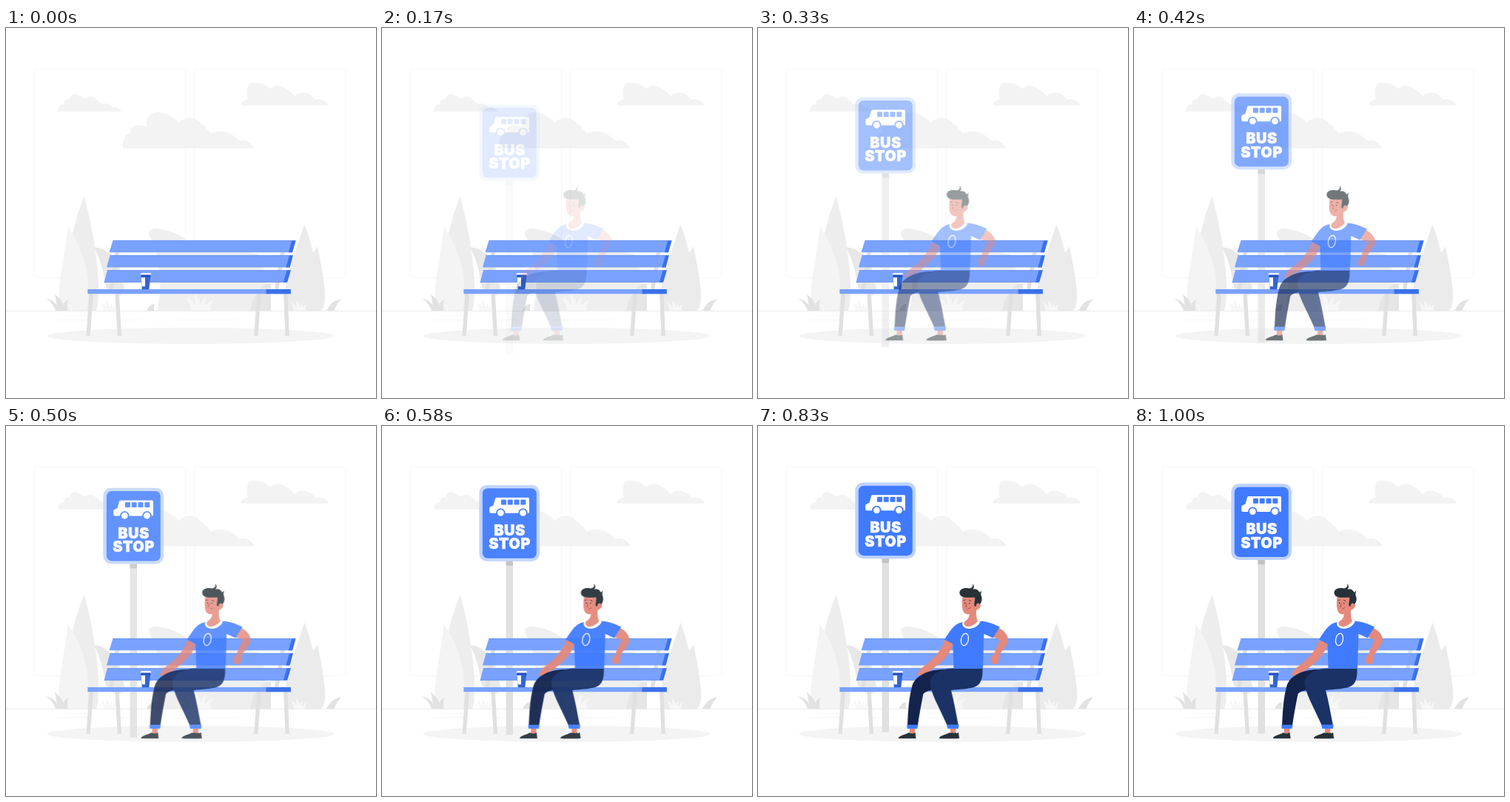
An HTML page for the animation above (1.04 s loop, 500 by 500 pixels).

```html
<!DOCTYPE html>
<html lang="en">
<head>
<meta charset="utf-8">
<title>Bus stop</title>
<style>
  html, body { margin: 0; width: 100%; height: 100%; overflow: hidden; background: #fff; }
  svg { display: block; width: 100vw; height: 100vh; }
  .slide {
    animation: slide 1s cubic-bezier(.36, -.01, .5, 1.38) var(--delay, 0s) both paused;
  }
  #sign { --from: 0px, 30px; }
  #man { --from: -30px, 0px; }
  @keyframes slide {
    from { opacity: 0; transform: translate(var(--from)); }
    to { opacity: 1; transform: translate(0px, 0px); }
  }
  text {
    font: 900 20px Inter, "Liberation Sans", sans-serif;
    fill: #fff; stroke: #fff; stroke-width: .5; letter-spacing: .4px; text-anchor: middle;
  }
</style>
</head>
<body>
<svg viewBox="0 0 500 500">
  <!-- windows and clouds -->
  <g fill="none" stroke="#f6f6f6">
    <rect x="38.5" y="55.5" width="204" height="282" rx="4"/>
    <rect x="254.5" y="55.5" width="204" height="282" rx="4"/>
  </g>
  <g fill="#f3f3f3">
    <path d="M70.5 112.7C70 106 74 103 79 103C78 97 82 95 86 97C86 89 94 88 98 91C102 92 104 95 107 95C112 91 118 92 121 96C125 98 127 102 130 102.5C136 101 141 103 144 107C149 106 154 109 156.5 112.7Z"/>
    <path d="M158.5 162.5C156 152 161 142 169 141C167 132 177 128 190 134C188 120 198 113 208 114C219 115 228 122 234 128C240 120 252 119 260 126C268 131 273 138 277 143C289 135 309 143 316 153C321 149 332 154 335 162.5Z"/>
    <path d="M317 104.7C319 99 323 97 327 96C324 84 326 74 335 73.5C343 73 351 77 357 82C366 74 380 80 390 92C399 83 412 88 418 97C425 94 433 98 436 104.7Z"/>
  </g>

  <!-- plants -->
  <path fill="#efefef" d="M193 279C193 271 201 269 211 272C224 275 241 281 246 290C262 300 330 300 345 308L358 382H205C213 340 206 300 193 279Z"/>
  <path fill="#e8e8e8" d="M118.500 296C133 296 149 310 155 328L160 352C160 366 145 364 135 350C132 330 127 310 118.500 296Z"/>
  <path fill="#e6e6e6" d="M330 382C332 364 345 345 358 345V382Z"/>
  <path fill="#ededed" d="M105.500 228C99 244 88 275 85 310C82 350 84 368 90 382H122C131 350 118 270 105.500 228Z"/>
  <path fill="#f4f4f4" d="M83.500 268C82 290 73 330 71 365Q71 377 75 382H108Q113 372 111 345C109 315 99 290 83.500 268Z"/>
  <path fill="#ebebeb" d="M403 265C397 288 379 330 376 366Q376 377 380 382H426Q432 376 431 358C429 330 424 312 421 295Q418 300 415 304Q410 282 403 265Z"/>
  <g fill="#e2e2e2">
    <path d="M54 365Q65 368 69 375Q67 366 66 360Q75 366 77 374Q79 370 84 367Q82 376 84 382H67Q63 371 54 365Z"/>
    <path d="M453 367Q441 367 433 382H444Q446 373 453 367Z"/>
    <path d="M201 373Q194 373 190 382H200Q199 377 201 373Z"/>
  </g>
  <g fill="#f7f7f7">
    <path id="grass" d="M243 364Q253 367 256 375Q256 366 254 359Q262 364 263 374Q266 367 271 362Q268 370 269 376Q273 370 280 368Q275 374 276 382H250Q248 370 243 364Z"/>
    <use href="#grass" transform="translate(-18 148) scale(.6 .613)"/>
    <use href="#grass" transform="translate(239 148) scale(.6 .613)"/>
  </g>
  <path stroke="#ececec" d="M0 382.500H500"/>
  <path stroke="#f7f7f7" d="M80 388.500H115M66 394.500H114M150 394.500H182M232 394.500H312"/>
  <ellipse cx="249.500" cy="416" rx="194" ry="11" fill="#f4f4f4"/>

  <!-- sign -->
  <g id="sign" class="slide">
    <path fill="#e0e0e0" d="M167.500 180h9.500v235.700h-9.500z"/>
    <path fill="#c2c2c5" d="M167.500 180h9.500v7h-9.500z"/>
    <rect x="131.300" y="78" width="81.700" height="103" rx="10.500" fill="#bfd3ff"/>
    <rect x="135.800" y="82.500" width="73" height="94.500" rx="7" fill="#407bff"/>
    <path fill="#fff" d="M154.500 95H197.500Q199 95 199 96.500V114.500Q199 116 197.500 116H147Q145.200 116 145.200 114V109.500Q145.200 107.500 147 107L150.500 105.500L153 96.500Q153.300 95 154.500 95Z"/>
    <g fill="#407bff">
      <rect x="161" y="97.700" width="7" height="7" rx="1"/>
      <rect x="169.700" y="97.700" width="7" height="7" rx="1"/>
      <rect x="178.500" y="97.700" width="7" height="7" rx="1"/>
      <rect x="187.300" y="97.700" width="7" height="7" rx="1"/>
    </g>
    <g fill="#fff" stroke="#407bff" stroke-width="1.800">
      <circle cx="160.300" cy="115.700" r="5.300"/>
      <circle cx="190.500" cy="115.700" r="5.300"/>
    </g>
    <text x="172.500" y="146.300">BUS</text>
    <text x="172.500" y="164.500">STOP</text>
  </g>

  <!-- bench -->
  <g fill="#e0e0e0">
    <path d="M148 300h5.500L145 353h-5.500zM371.500 300h5.500L368.500 353h-5.500z"/>
    <path d="M112.500 358h5.500L113.700 416h-5.200zM147.300 358h5.500L156 416h-5.300zM339.500 358h5.500L340.300 416h-5.300zM375 358h5.500L382.800 416h-5.300z"/>
  </g>
  <g fill="#79a2ff">
    <path d="M144.500 287H391.500L387 303.300H139.500Z"/>
    <path d="M140.500 307H388L383.500 323.500H136Z"/>
    <path d="M137 327.300H384.800L380 343.700H132.500Z"/>
    <path d="M110.300 353H384.800V359.200H110.300Z"/>
  </g>
  <g fill="#3b70e8">
    <path d="M386.300 287H391.500L387 303.300H381.800Z"/>
    <path d="M383 307H388L383.500 323.500H378.300Z"/>
    <path d="M379.600 327.300H384.800L380 343.700H374.800Z"/>
    <path d="M351.500 353H384.800V359.200H351.500Z"/>
  </g>
  <path stroke="#6690ea" stroke-width=".7" d="M144.500 287.300H391M140.500 307.300H388M137 327.600H384.500M132.700 343.500H380"/>

  <!-- cup -->
  <path fill="#3564d0" d="M182.500 333H195.500L193.300 353.300H183.700Z"/>
  <path fill="#2851b5" d="M182.500 333.500H195.500L195.200 336.500H182.700Z"/>
  <path fill="#fff" d="M182.800 337H188V349.300H183.500Z"/>
  <path fill="#f0f4ff" d="M182.500 331H195.500L196.200 333.600H181.500Z"/>

  <!-- man -->
  <g id="man" class="slide">
    <g fill="#e4897b">
      <path d="M322 272C331 276 337 284 336 290C335 297 327 303 324 311C325 317 322 322 318 322C313 322 312 318 313 314C314 311 317 309 318 306C320 298 325 292 325 289C322 287 318 286 314 285Z"/>
      <path d="M250.500 289C247 302 235 315 222 325C217 328 214 333 213 337H222C240 324 257 313 262 293Z"/>
    </g>
    <path fill="#13234c" d="M272 328L245 329C222 331 209 340 206 353C201 372 201 390 200 405H214C216 390 219 375 221.500 362Q226 356 245 357Z"/>
    <path fill="#1a3266" d="M301.500 327.500H262C245 328 232 335 230.500 346C231 360 241 376 254 405H269C266 390 263 372 259 357C270 356 283 355 290 353C300 350 302 340 301.500 327.500Z"/>
    <path fill="#407bff" d="M274 265C263 267 257 278 250 288.500L261.500 294.500L262.500 328H302L303.500 281L315.500 286.500L325 271.500C316 267 307 264 297 263.500Z"/>
    <path fill="#fff" d="M275 264.500C273 267 274 273 283 274C291 274 298 268 298.500 264L294 262Z"/>
    <path fill="#e4897b" d="M284 250L293.500 245Q292 258 295 263.500C292 268 286 271.500 281 271C276 270 276 266 277.500 264C283 261 284.500 256 284 250Z"/>
    <path fill="#e4897b" d="M275 229C273.500 237 273 247 276.500 252C280 256 287 255 291 249C294 249 298 247 299 243Q299 239 295 239L293 230Z"/>
    <path fill="#263238" d="M270.500 226C270 220 277 218 283.500 219.500C288 219 289 216 288 213C291 216 290 219 288.500 221C293 219 296 222 297.500 225L300.300 222.500C299.300 226 299 228 300 230C302 236 299 240 297.500 241C295 238 293 240 292.500 244L290.500 243C290 238 292 235 291 231.500C286 232 278 232 275 231C272 230 271 228 270.500 226Z"/>
    <g fill="none" stroke="#263238" stroke-linecap="round" stroke-width=".8">
      <path d="M276 235.500L278 235M283.500 235.500L286 236.500"/>
      <path stroke-width="1.300" d="M277.700 239v.5M283.800 239.300v.5"/>
      <path stroke="#a4443d" d="M280 240L278.800 244.300H280M281.500 247Q284 247 285 245.300"/>
    </g>
    <ellipse cx="277.500" cy="288.500" rx="4.900" ry="8.300" fill="none" stroke="#fff" stroke-width="1.300" transform="rotate(11 277.500 288.500)"/>
    <g id="foot">
      <path fill="#e4897b" d="M203 408H210.500L210 416H203Z"/>
      <path fill="#407bff" d="M199.300 403.800H214.500L213.500 409H199.700Z"/>
      <path fill="#263238" d="M188 422.300C187.500 419 196 417.500 202 414.300C204 416 208 416 210.500 414L211.700 422.300Z"/>
    </g>
    <use href="#foot" x="58.500" transform="translate(-3.500 0)"/>
    <path fill="#407bff" d="M253 403.800H269.300L269 409H254.500Z"/>
    <path fill="#263238" d="M246.300 422.300C246 419 255 417.500 260.500 414.300C263 416 266 416 269 414L270.200 422.300Z"/>
  </g>
</svg>
<script>
  // The slide advances in steps of 24 per second; the first two stay hidden.
  const loop = 1040, rate = 24;
  const root = document.documentElement;
  const start = performance.now();

  function draw() {
    const time = (performance.now() - start) % loop;
    const step = Math.floor((time + 4) * rate / 1000);
    const pose = step < 2 ? 0 : (step + 1) * 1000 / rate;
    root.style.setProperty("--delay", -pose + "ms");
    requestAnimationFrame(draw);
  }
  draw();
</script>
</body>
</html>
```
